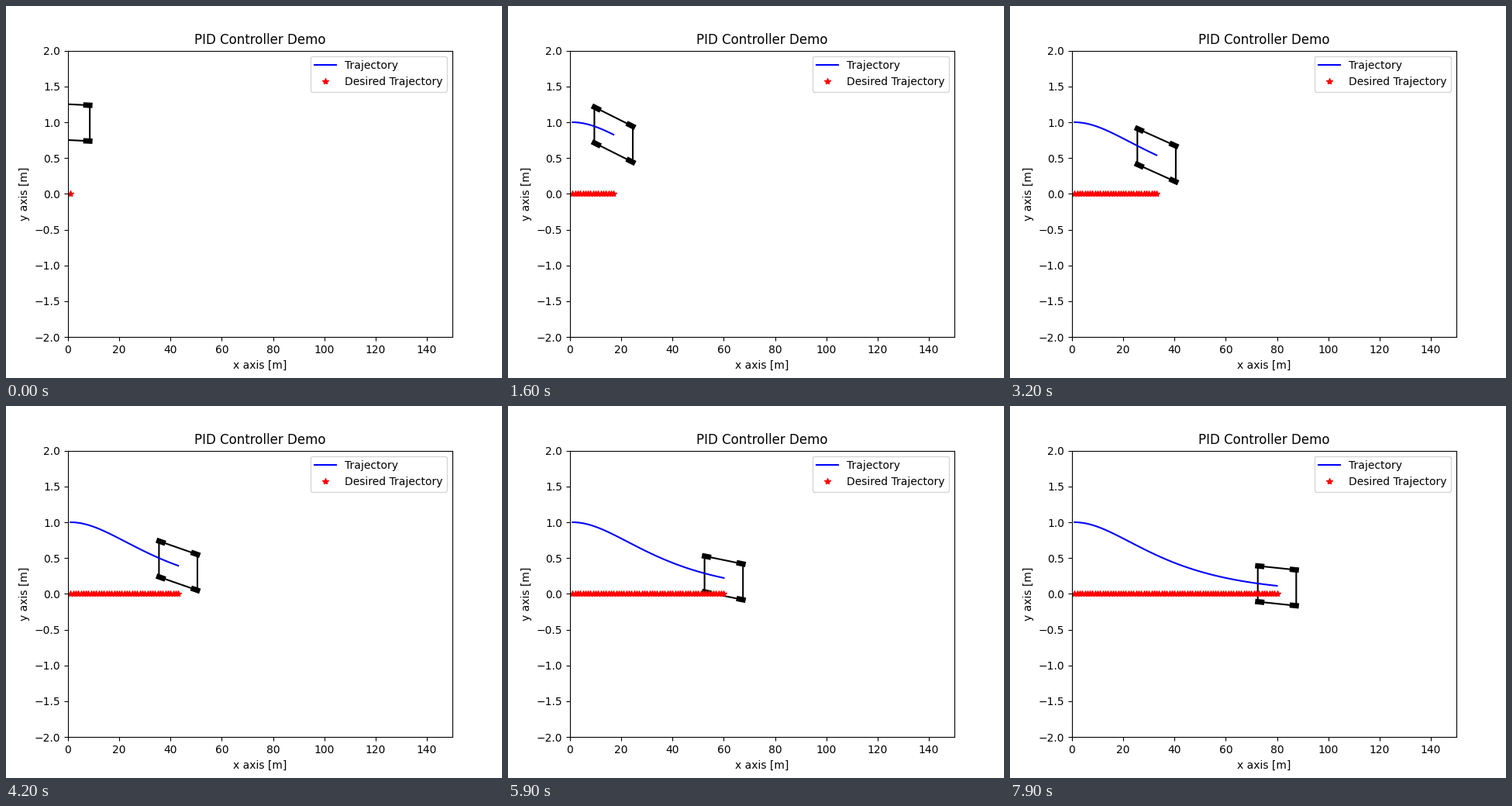
A matplotlib script that plays this animation: 640x480 px, repeating every 8000 ms.

```python
import numpy as np
import matplotlib.pyplot as plt
from matplotlib.animation import FuncAnimation

STEPS = 80
HALF_LEN, HALF_WID, WHEEL = 7.5, 0.25, 1.5


def offset(t):
    """Cross-track error: a slow decay less a fast damped transient."""
    wt = 0.042 * t
    slow = 1.645 * np.exp(-0.034 * t)
    fast = np.exp(-0.1 * t) * (0.645 * np.cos(wt) + 0.205 * np.sin(wt))
    return slow - fast


def heading(t):
    return np.arctan(offset(t + 1.5) - offset(t + 0.5))


def place(points, x, y, angle):
    c, s = np.cos(angle), np.sin(angle)
    px, py = np.array(points).T
    return x + c * px - s * py, y + s * px + c * py


BODY = [(HALF_LEN, HALF_WID), (HALF_LEN, -HALF_WID), (-HALF_LEN, -HALF_WID),
        (-HALF_LEN, HALF_WID), (HALF_LEN, HALF_WID)]
WHEELS = [[(sx * (HALF_LEN - WHEEL), sy * HALF_WID), (sx * HALF_LEN, sy * HALF_WID)]
          for sx in (1, -1) for sy in (1, -1)]

steps = np.arange(STEPS)
xs = steps + 1.0
ys = offset(steps)

fig, ax = plt.subplots(figsize=(6.4, 4.8), dpi=100)
ax.set(xlim=(0, 150), ylim=(-2, 2), title="PID Controller Demo",
       xlabel="x axis [m]", ylabel="y axis [m]")

body, = ax.plot([], [], "k-", lw=1.5)
wheels = [ax.plot([], [], "k-", lw=5)[0] for _ in WHEELS]
path, = ax.plot([], [], "b-", label="Trajectory")
goal, = ax.plot([], [], "r*", label="Desired Trajectory")
ax.legend(loc="upper right")


def update(i):
    pose = xs[i], ys[i], heading(i)
    body.set_data(*place(BODY, *pose))
    for line, pts in zip(wheels, WHEELS):
        line.set_data(*place(pts, *pose))
    path.set_data(xs[:i + 1], ys[:i + 1])
    goal.set_data(xs[:i + 1], np.zeros(i + 1))
    return [body, *wheels, path, goal]


anim = FuncAnimation(fig, update, frames=STEPS, interval=100, repeat=True, repeat_delay=0)
plt.show()
```
